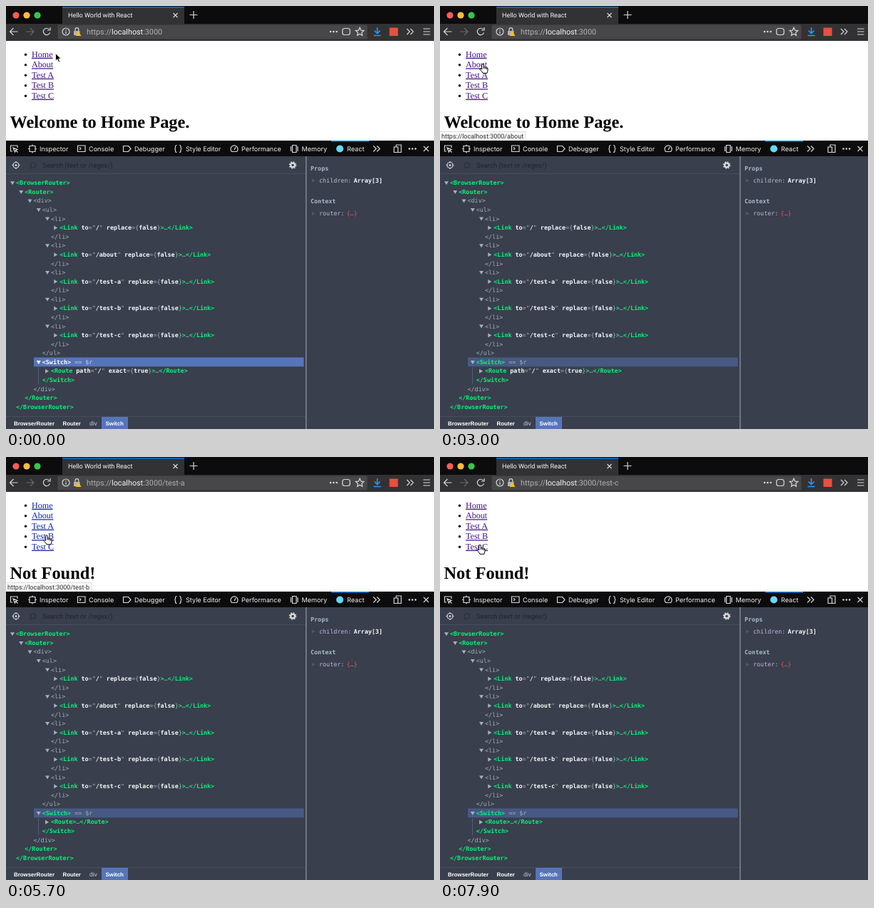
An HTML page for the animation above (8000 ms loop, 600 by 594 pixels).

```html
<!DOCTYPE html>
<html lang="en">
<head>
<meta charset="utf-8">
<title>Router demo</title>
<style>
html, body { margin: 0; width: 100%; height: 100%; overflow: hidden; background: #fff; }
svg { display: block; width: 600px; height: 594px; }
text { white-space: pre; text-rendering: geometricPrecision; }
.ui { font-family: Roboto, sans-serif; }
.tool { font: 9.1px Inter, sans-serif; fill: #f0f0f3; }
.page { font-family: "Liberation Serif", serif; }
.mono { font: 8.39px "DejaVu Sans Mono", monospace; fill: #a3b0bf; }
.crumb { font: bold 7.9px "Liberation Sans", sans-serif; fill: #fff; }
.crumb .plain { font-weight: 400; font-size: 8.5px; fill: #c3ccd8; }
.link { font-size: 12.1px; text-decoration: underline; }
.tag { fill: #00f57c; font-weight: bold; }
.attr { fill: #f4f8fc; font-weight: bold; }
.focused .tag, .focused .arrow { fill: #fff; }
.focused .dim { fill: #c3cfe4; }
.line { fill: none; stroke: #d8d8dc; stroke-width: 1.2; }
</style>
</head>
<body>
<svg viewBox="0 0 600 594">
  <!-- browser frame -->
  <path fill="#0c0c0d" d="M0 0H600V25H0Z"/>
  <path fill="#323234" d="M79 0H250V25H600V49H0V25H79Z"/>
  <path fill="#0c0c0d" d="M79 0H250V1H79Z"/>
  <path fill="#0a74dd" d="M79 1H250V2.400H79Z"/>
  <circle cx="14" cy="13" r="4.600" fill="#fc5b57"/>
  <circle cx="29" cy="13" r="4.600" fill="#fdbc40"/>
  <circle cx="44" cy="13" r="4.600" fill="#34c84a"/>
  <text class="ui" x="87" y="16.300" font-size="9" fill="#f9f9fa">Hello World with React</text>
  <path class="line" d="M234.500 10l6 6m0-6l-6 6M257.500 12.500h11m-5.500-5.500v11"/>
  <rect x="72.500" y="26.500" width="434" height="20" rx="2" fill="#474749"/>
  <g class="line">
    <path d="M16.500 36H5.500m5-5l-5 5 5 5"/>
    <path style="stroke:#69696b" d="M28 36h11m-5-5l5 5-5 5"/>
    <path d="M60.500 32.800a4.700 4.700 0 1 0 1 4.600M62 30v4h-4"/>
    <circle cx="84" cy="36" r="5"/>
    <path d="M84 35.500v3.500m0-6v1.200M97 35v-2a2.400 2.400 0 0 1 4.800 0v2"/>
    <rect x="471.700" y="31.500" width="10.500" height="9" rx="3"/>
    <path d="M496 30.300l1.700 3.800 4 .4-3 2.800 .8 4-3.500-2-3.500 2 .8-4-3-2.800 4-.4z"/>
    <path d="M562 32l4 4-4 4m5-8l4 4-4 4M585 32h9.500m-9.500 4h9.500m-9.500 4h9.500"/>
    <path style="stroke:#2b95ff;stroke-width:1.600" d="M520.500 30v8m-4-3.500l4 4 4-4M515.500 41.500h10"/>
  </g>
  <path fill="#b4b4b6" d="M95 35h8.500v6H95z"/>
  <path fill="#ffbf1a" d="M101.500 35.500l4 6.500h-8z"/>
  <g fill="#d8d8dc">
    <circle cx="455" cy="36" r="1.300"/><circle cx="459.300" cy="36" r="1.300"/><circle cx="463.600" cy="36" r="1.300"/>
  </g>
  <rect x="537.500" y="30.500" width="12" height="11.500" fill="#e8503f"/>
  <text class="ui" y="40" font-size="10.800" x="113" fill="#b1b1b3">https://<tspan fill="#f5f5f7">localhost</tspan>:3000<tspan id="path"></tspan></text>

  <!-- web page -->
  <path fill="#fff" d="M0 49H600V189H0Z"/>
  <g id="links" class="page"></g>
  <text id="title" class="page" x="5.500" y="170.900" font-size="24.400" font-weight="bold"></text>
  <g id="status">
    <rect id="statusBox" x="-1" y="176.500" height="13" fill="#f9f9fa" stroke="#dedee0"/>
    <text id="statusText" class="ui" x="2" y="185.800" font-size="9" fill="#2c2c2e"></text>
  </g>

  <!-- developer tools -->
  <path fill="#0c0c0d" d="M0 189H600V211H0Z"/>
  <path fill="#0a84ff" d="M456 189H509V190.500H456Z"/>
  <g class="line">
    <path d="M9 204H6.500v-8h9.500v3M10 199l6 2.500-2.600 1-1 2.600zM13.500 202.500l3 3"/>
    <path d="M33 196.500h8v8h-8zM31 200.500h2m8 0h2M37 194.500v2m0 8v2"/>
    <path d="M100.500 196h10.500v8.500h-10.500zM103 198.500l2 1.800-2 1.800"/>
    <path d="M164.500 196.500h7l3.500 4-3.500 4h-7z"/>
    <path d="M239.500 195.500q-2 0-2 2v1.500q0 1.500-1.500 1.500 1.500 0 1.500 1.500v1.500q0 2 2 2M243 195.500q2 0 2 2v1.500q0 1.500 1.500 1.500-1.500 0-1.500 1.500v1.500q0 2-2 2"/>
    <path d="M316.500 204.500a5 5 0 1 1 7 0zM320 202l2-4"/>
    <path d="M401.500 195.500h5.500v10h-5.500zM399.500 197v7m9.500-7v7"/>
    <path d="M515 196.500l4 4-4 4m5-8l4 4-4 4"/>
    <path d="M547 197.500v-2.500h7v10.500h-4M544 198h5.500v7.500H544z"/>
    <path d="M585.500 197l7 7m0-7l-7 7"/>
  </g>
  <circle cx="468" cy="200.500" r="5" fill="#61dafb"/>
  <g fill="#d8d8dc">
    <circle cx="565.500" cy="200.500" r="1.300"/><circle cx="569.800" cy="200.500" r="1.300"/><circle cx="574.100" cy="200.500" r="1.300"/>
  </g>
  <g id="tools" class="tool"></g>

  <path fill="#393f4c" d="M0 211H600V594H0Z"/>
  <path fill="none" stroke="#474e5c" d="M0 235.500H420M0 576.500H420"/>
  <path fill="none" stroke="#858c98" stroke-width="1.400" d="M420.700 211V594"/>
  <g class="line">
    <circle cx="14" cy="223.500" r="4"/><circle cx="14" cy="223.500" r="1"/>
    <path d="M14 218v2m0 7v2m-5.500-5.500h2m7 0h2"/>
    <circle cx="402" cy="223.500" r="2.900" style="stroke-width:2.300"/>
    <circle cx="402" cy="223.500" r="4.500" style="stroke-width:1.600;stroke-dasharray:1.770"/>
    <path style="stroke:#2b303a" d="M35 226.500l-2 2.500M41.500 223.500a3.500 3.500 0 1 1-7 0 3.500 3.500 0 0 1 7 0"/>
  </g>
  <text class="ui" x="51" y="227" font-size="9.500" fill="#20252e">Search (text or /regex/)</text>

  <rect id="selection" x="39" y="493.500" width="378.500" height="12.800"/>
  <path stroke="#515d78" d="M45.500 507V531"/>
  <g id="tree" class="mono"></g>

  <g class="mono">
    <g font-weight="bold" fill="#a9bacb">
      <text x="427" y="231">Props</text><text x="427" y="277.300">Context</text>
    </g>
    <path fill="#515868" d="M429 242.500l4.500 2.500-4.500 2.500zM429 289l4.500 2.500-4.500 2.500z"/>
    <text x="439" y="247.800" fill="#bcb8db">children:</text>
    <text x="487.500" y="247.800" class="attr">Array[3]</text>
    <text x="439" y="294.300" fill="#bcb8db">router:</text>
    <text x="477.500" y="294.300" fill="#eb5368">{…}</text>
  </g>

  <path fill="#5675b9" d="M134 577H171V594H134Z"/>
  <g class="crumb">
    <text x="11" y="589.100">BrowserRouter</text>
    <text x="79.500" y="589.100">Router</text>
    <text x="117" y="589.100" class="plain">div</text>
    <text x="139.500" y="589.100">Switch</text>
  </g>

  <path id="arrow" fill="#000" stroke="#fff" stroke-width=".8" d="M0 0V10.500L2.500 8.200 4.200 12.200 6 11.400 4.300 7.600H7.700Z"/>
  <path id="hand" fill="#fff" stroke="#000" stroke-linejoin="round"
    d="M-1.300 1.200Q0-.8 1.300 1.200V4.600Q2.500 4 3.400 5 4.500 4.400 5.400 5.600 7 5.400 7 7V9.500Q6.500 11 6 13.300H0Q-1 11-4 8.200-4.300 6.400-2.600 7L-1.300 8ZM1.300 4.600V7M3.400 5V7.500M5.400 5.600V8"/>
</svg>
<script>
const $ = id => document.getElementById(id);
const span = (cls, s) => `<tspan class="${cls}">${s}</tspan>`;
const tag = s => span("tag", s.replace(/</g, "&lt;"));
const attr = (name, open, value, close) => " " + span("attr", name) + "=" + open + span("attr", value) + close;
const text = (name, path) => attr(name, '"', path, '"');
const bool = (name, value) => attr(name, "{", value, "}");
const element = (name, attrs) => tag("<" + name) + attrs + tag(">") + "…" + tag(`</${name}>`);

const origin = "https://localhost:3000";
const paths = ["/", "/about", "/test-a", "/test-b", "/test-c"];

$("links").innerHTML = ["Home", "About", "Test A", "Test B", "Test C"].map((label, i) => {
  const y = 71.8 + 14.5 * i;
  return `<circle cx="27.500" cy="${y - 3.6}" r="1.700" fill="#000"/><text class="link" x="36" y="${y}">${label}</text>`;
}).join("");

$("tools").innerHTML = Object.entries({
  Inspector: 47, Console: 116, Debugger: 180, "Style Editor": 252, Performance: 330, Memory: 414.5, React: 478
}).map(([label, x]) => `<text x="${x}" y="203.500">${label}</text>`).join("");

// Rows: depth, content, foldable state (1 open, 2 closed), id
const rows = [
  [0, tag("<BrowserRouter>"), 1], [1, tag("<Router>"), 1], [2, "&lt;div>", 1], [3, "&lt;ul>", 1],
  ...paths.flatMap(p => [
    [4, "&lt;li>", 1],
    [5, element("Link", text("to", p) + bool("replace", "false")), 2],
    [4, "&lt;/li>"]
  ]),
  [3, "&lt;/ul>"],
  [3, tag("<Switch>") + span("dim", " == $r"), 1, "switch"],
  [4, "", 2, "route"],
  [3, tag("</Switch>")], [2, "&lt;/div>"], [1, tag("</Router>")], [0, tag("</BrowserRouter>")]
];
const folds = ["", "l6 0-3 5z", "l5 3-5 3z"];
$("tree").innerHTML = rows.map(([depth, content, fold = 0, id = ""], i) => {
  const x = 14 + 12.25 * depth, y = 251.3 + 12.58 * i;
  const mark = fold && `<path class="arrow" d="M${x - 8} ${y - (fold == 1 ? 5 : 5.7)}${folds[fold]}"/>`;
  return `<g id="${id}">${mark || ""}<text x="${x}" y="${y}">${content}</text></g>`;
}).join("");

const clicks = [[3200, 1], [4900, 2], [5800, 3], [7500, 4]];
const hovers = [[1050, 1600, 0], [2600, 3200, 1], [4150, 4900, 2], [5400, 5800, 3], [6950, 7500, 4]];
const moves = [
  [0, 69.5, 66.5], [500, 69.5, 66.5], [900, 62, 67.5], [1700, 62, 67.5], [2000, 68, 72], [2250, 68, 72],
  [2550, 60, 81], [3400, 60, 81], [3900, 58.5, 95.5], [5000, 58.5, 95.5], [5250, 57, 109.5],
  [6100, 57, 109.5], [6700, 56, 123], [8000, 56, 123]
];

function pointer(t) {
  const i = moves.findIndex(m => m[0] > t);
  const [t0, x0, y0] = moves[i - 1], [t1, x1, y1] = moves[i];
  const u = (t - t0) / (t1 - t0), k = u * u * (3 - 2 * u);
  return [x0 + (x1 - x0) * k, y0 + (y1 - y0) * k];
}

let shown = -1;
function showPage(page) {
  if (page === shown) return;
  shown = page;
  $("path").textContent = page ? paths[page] : "";
  $("title").textContent = ["Welcome to Home Page.", "About Page."][page] || "Not Found!";
  $("route").lastChild.innerHTML =
    element("Route", page < 2 ? text("path", paths[page]) + bool("exact", "true") : "");
}

function render(t) {
  showPage(clicks.reduce((page, [at, next]) => t >= at ? next : page, 0));

  // Links lose their visited colour briefly while a click is handled
  const fresh = clicks.some(([at]) => t >= at - 110 && t < at);
  $("links").setAttribute("fill", fresh ? "#0a22a6" : "#3f1085");

  const focused = t < 1600;
  $("selection").setAttribute("fill", focused ? "#5675b9" : "#475983");
  $("switch").setAttribute("class", focused ? "focused" : "");

  const hover = hovers.find(([from, to]) => t >= from && t < to);
  $("status").setAttribute("opacity", hover ? Math.min(1, (t - hover[0]) / 250) : 0);
  if (hover) {
    $("statusText").textContent = origin + (hover[2] ? paths[hover[2]] : "");
    $("statusBox").setAttribute("width", $("statusText").getComputedTextLength() + 6);
  }

  const [x, y] = pointer(t), overLink = x < 66;
  for (const id of ["arrow", "hand"]) {
    $(id).setAttribute("transform", `translate(${x} ${y})`);
    $(id).setAttribute("visibility", (id === "hand") === overLink ? "visible" : "hidden");
  }
}

const start = performance.now();
function tick() {
  render((performance.now() - start) % 8000);
  requestAnimationFrame(tick);
}
tick();
</script>
</body>
</html>
```
